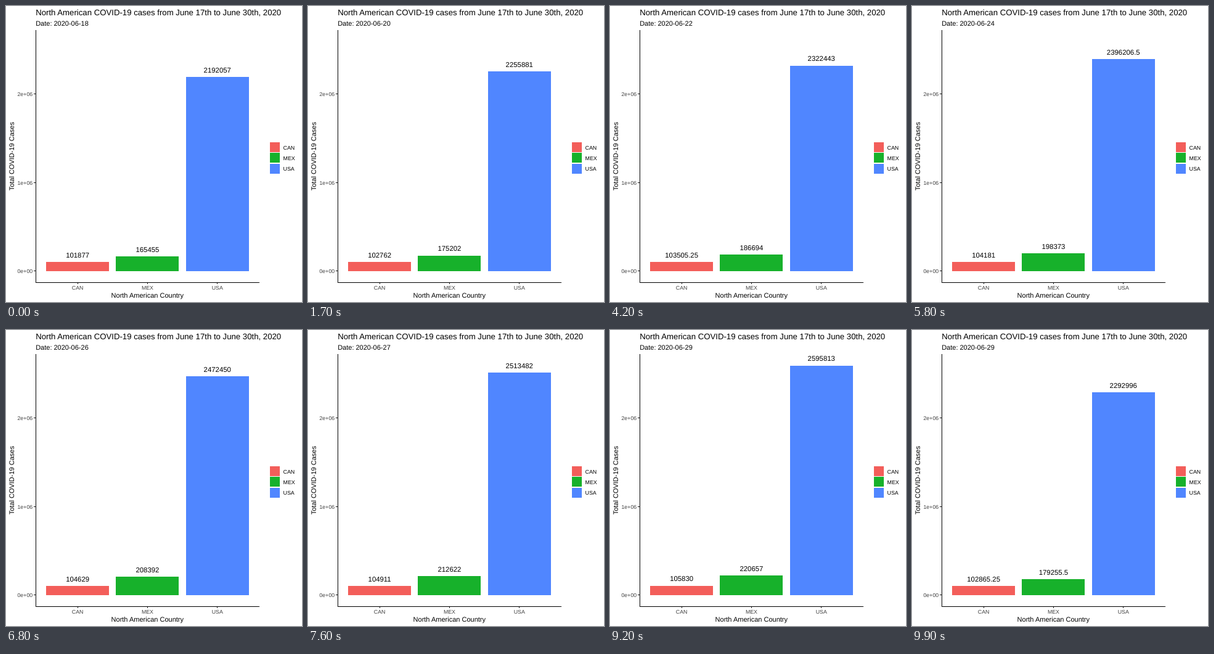
Write an HTML page that moves like this. It is 480x480 px and loops after 10000 ms.

```html
<!DOCTYPE html>
<html lang="en">
<head>
<meta charset="utf-8">
<title>Case counts by country</title>
<style>
  html, body { margin: 0; width: 100%; height: 100%; overflow: hidden; background: #fff; }
  svg { display: block; width: 100vw; height: 100vh; }
  text { font-family: "Liberation Sans", Arial, sans-serif; text-rendering: geometricPrecision; }
  rect, path { shape-rendering: crispEdges; }
</style>
</head>
<body>
<svg id="chart" viewBox="0 0 480 480"></svg>
<script>
// Counts run straight between a few key days and return to the first one.
const keyDays = [0, 2, 4.25, 6.25, 8, 10, 11, 12];
const countries = [
  { code: 'CAN', color: '#F35E5A', keys: [101877, 102762, 103505.25, 104181, 104629, 105193, 105830] },
  { code: 'MEX', color: '#17B12B', keys: [165455, 175202, 186694, 198373, 208392, 216852, 220657] },
  { code: 'USA', color: '#5086FF', keys: [2192057, 2255881, 2322443, 2396206.5, 2472450, 2554514, 2595813] }
];
const FIRST_DATE = 18;
const DAYS = 12;
const STEP = 100;                                            // ms per picture
const LOOP = 100;                                            // pictures per loop
const panel = { left: 48.15, right: 410.75, top: 38.9, bottom: 448.5 };
const unit = (panel.right - panel.left) / 3.2;
const barWidth = unit * 0.9;
const GREY = '#404040';

const xOf = i => panel.left + unit * (i + 0.6);
const yOf = value => 429.9 - value * 143.46e-6;

// A day lasts eight pictures; four of the early ones last nine.
const startOf = day => day === DAYS ? LOOP : 8 * day + Math.min(Math.max(day - 1, 0), 4);

function casesAt(keys, day) {
  const i = keyDays.findLastIndex(key => key <= day);
  const part = (day - keyDays[i]) / (keyDays[i + 1] - keyDays[i]);
  const value = keys[i] + (keys[(i + 1) % keys.length] - keys[i]) * part;
  const precision = Number.isInteger(day) ? 1 : 4;
  return Math.round(value * precision) / precision;
}

const chart = document.getElementById('chart');

function add(tag, attributes, content = '') {
  const node = document.createElementNS('http://www.w3.org/2000/svg', tag);
  for (const name in attributes) node.setAttribute(name, attributes[name]);
  node.textContent = content;
  return chart.appendChild(node);
}

function label(content, x, y, size, anchor = 'start', fill = '#000', extra = {}) {
  return add('text', { x, y, 'font-size': size, 'text-anchor': anchor, fill, ...extra }, content);
}

function line(d, stroke) {
  return add('path', { d, stroke, fill: 'none', 'stroke-width': 1 });
}

label('North American COVID-19 cases from June 17th to June 30th, 2020', 48.15, 15, 13.2);
const dateLabel = label('', 48.15, 32, 11);

countries.forEach((country, i) => {
  country.bar = add('rect', { x: xOf(i) - barWidth / 2, width: barWidth, fill: country.color });
  country.count = label('', xOf(i), 0, 11.38, 'middle');

  line(`M${xOf(i)} ${panel.bottom}v2.75`, '#222');
  label(country.code, xOf(i), 460.2, 8.8, 'middle', GREY);

  const keyY = 229.1 + i * 17.28;
  add('rect', { x: 428.1, y: keyY - 7.93, width: 15.86, height: 15.86, fill: country.color });
  label(country.code, 449.6, keyY + 3.4, 8.8);
});

['0e+00', '1e+06', '2e+06'].forEach(tick => {
  const y = yOf(Number(tick));
  line(`M${panel.left} ${y}h-2.75`, '#222');
  label(tick, 43.2, y + 3.4, 8.8, 'end', GREY);
});
line(`M${panel.left} ${panel.top}V${panel.bottom}H${panel.right}`, '#000');
label('North American Country', 229.3, 473, 11, 'middle');
label('Total COVID-19 Cases', 0, 0, 11, 'middle', '#000', { transform: 'translate(13.4 243.7) rotate(-90)' });

function draw(time) {
  const picture = Math.floor(time / STEP) % LOOP;
  let day = 0;
  while (startOf(day + 1) <= picture) day++;
  // The last two pictures of a day lead over to the next one.
  const remaining = startOf(day + 1) - picture;
  const progress = remaining > 2 ? 0 : 1.25 - remaining / 2;

  dateLabel.textContent = `Date: 2020-06-${FIRST_DATE + day}`;
  for (const { keys, bar, count } of countries) {
    const value = casesAt(keys, day + progress);
    bar.setAttribute('y', yOf(value));
    bar.setAttribute('height', yOf(0) - yOf(value));
    count.setAttribute('y', yOf(value) - 7.3);
    count.textContent = value;
  }
}

function play() {
  draw(performance.now());
  requestAnimationFrame(play);
}
play();
</script>
</body>
</html>
```
